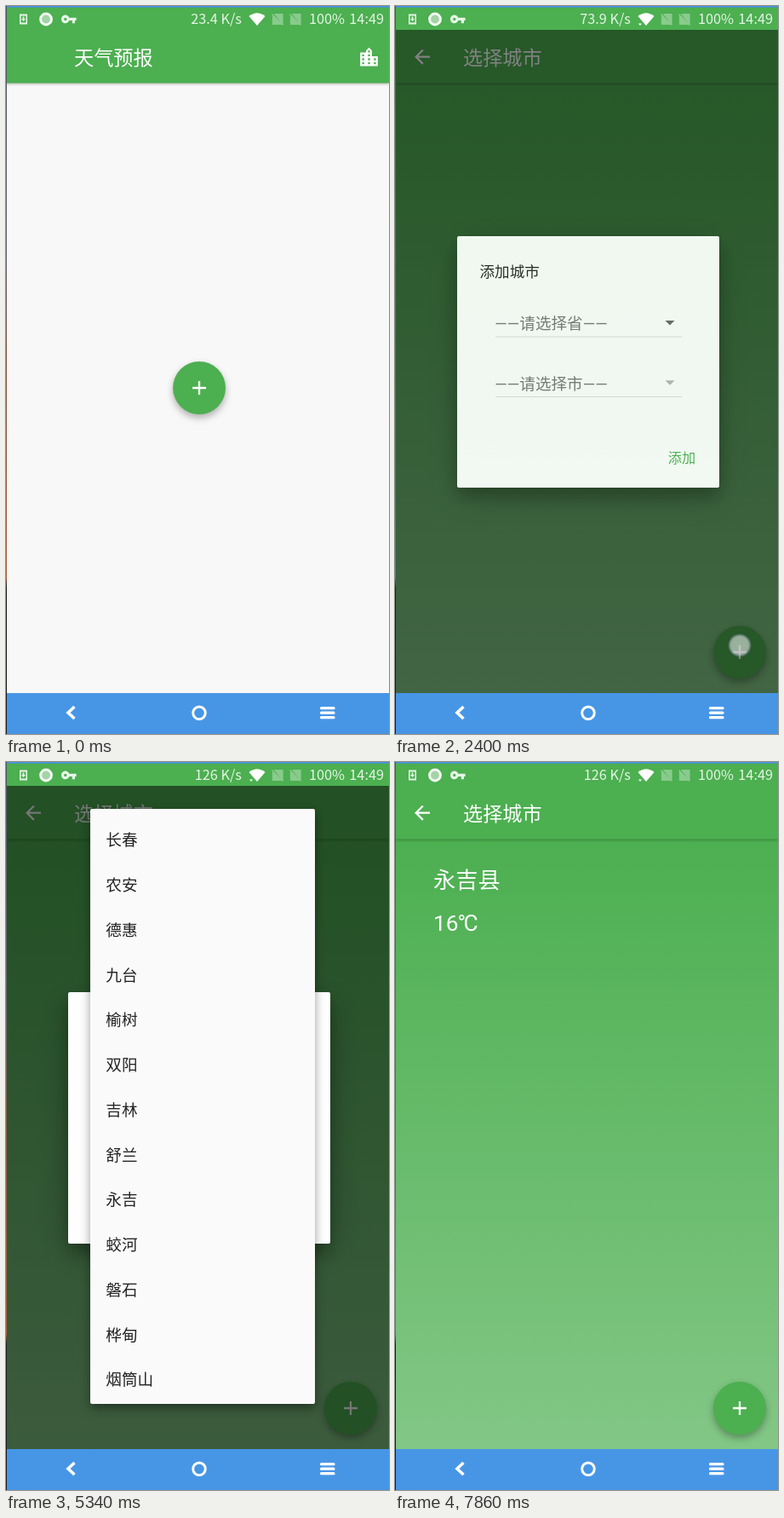
An HTML page for the animation above (8000 ms loop, 450 by 854 pixels).

```html
<!DOCTYPE html>
<html lang="zh-CN">
<head>
<meta charset="utf-8">
<title>天气预报</title>
<style>
  html, body { margin: 0; width: 100%; height: 100%; overflow: hidden; background: #f8f8f8; }
  svg { display: block; width: 450px; height: 854px; }
  text { font: 18.6px Roboto, "Noto Sans CJK SC", "Noto Sans CJK", sans-serif; fill: #242424; }
  .bar-text { font: 500 16.3px "Noto Sans CJK SC", "Noto Sans CJK", sans-serif; fill: #e6f5e7; text-anchor: end; }
  .title { font-size: 23.2px; fill: #fff; }
  .head { font-size: 17.6px; }
  .small { font-size: 16.2px; text-anchor: middle; }
  .action { font-weight: 500; fill: #4caf50; }
  .weather { font-size: 26.3px; fill: #fff; }
  .hint { fill: #777; }
  .green { fill: #4caf50; }
  .white { fill: #fff; }
  .raised { filter: drop-shadow(0 1px 1.5px rgba(0,0,0,.28)); }

  /* The clock below sets the time of every animation. */
  * { animation-play-state: paused !important; }

  /* Visible from --a to --b, fading over --i and --o. */
  .span {
    --a: 0ms; --b: 9000ms; --i: 0s; --o: 0s; --ease-out: linear;
    animation: show var(--i) ease-out var(--a) both,
               hide var(--o) var(--ease-out) var(--b) forwards;
  }
  @keyframes show { from { opacity: 0 } to { opacity: 1 } }
  @keyframes hide { from { opacity: 1 } to { opacity: 0 } }

  .page {
    animation: show 276ms cubic-bezier(.42,0,1,1) 1284ms both,
               rise 276ms cubic-bezier(.4,0,.2,1) 1284ms both;
  }
  @keyframes rise { from { transform: translateY(201px) } to { transform: none } }

  /* The button flies along a circular arc and stays upright. */
  .arc { transform-origin: 46px 758px; animation: arc 276ms cubic-bezier(.4,0,.2,1) 1284ms both; }
  .upright { transform-origin: 405px 758px; animation: upright 276ms cubic-bezier(.4,0,.2,1) 1284ms both; }
  @keyframes arc { from { transform: rotate(-59.72deg) } to { transform: rotate(0deg) } }
  @keyframes upright { from { transform: rotate(59.72deg) } to { transform: rotate(0deg) } }
  .fab { fill: #4caf50; filter: drop-shadow(0 4px 4px rgba(0,0,0,.3)); }

  .sheet {
    fill: #fefefe;
    filter: drop-shadow(0 10px 9px rgba(0,0,0,.25)) drop-shadow(0 10px 20px rgba(0,0,0,.22));
  }
  .panel {
    x: 99px; width: 264px; fill: #fafafa;
    filter: drop-shadow(0 5px 6px rgba(0,0,0,.38));
    animation: unfold 75ms ease calc(var(--a) + 75ms) both;
  }
  @keyframes unfold { from { y: 64px; height: 53px } to { y: 55px; height: 698px } }

  .touch { fill: url(#dot); }
  .drift { animation: drift 360ms ease-in-out 6660ms both; }
  @keyframes drift { to { transform: translate(-4px, -5px) } }
</style>
</head>
<body>
<svg viewBox="0 0 450 854">
  <defs>
    <linearGradient id="sky" gradientUnits="userSpaceOnUse" x1="0" y1="90" x2="0" y2="806">
      <stop stop-color="#4caf50"/><stop offset="1" stop-color="#83c786"/>
    </linearGradient>
    <linearGradient id="edge" x2="0" y2="1">
      <stop stop-color="#4d5566"/><stop offset=".35" stop-color="#6a6473"/>
      <stop offset=".5" stop-color="#8a5a40"/><stop offset=".785" stop-color="#a8603a"/>
      <stop offset=".8" stop-color="#1c1c1e"/><stop offset="1" stop-color="#1c1c1e"/>
    </linearGradient>
    <radialGradient id="dot">
      <stop stop-color="#fff" stop-opacity=".82"/><stop offset=".74" stop-color="#f6f6fc" stop-opacity=".82"/>
      <stop offset=".86" stop-color="#b4b4d0" stop-opacity=".75"/><stop offset="1" stop-color="#9a9ac0" stop-opacity="0"/>
    </radialGradient>
    <path id="nosim" d="M4 1h9v11zM1.500 3.500V13h9.500zM.5 1l13 13" stroke-width="1.200"/>
    <path id="caret" d="M-5.500-2.800h11l-5.500 5.600z"/>
  </defs>

  <!-- Home -->
  <rect width="450" height="854" fill="#f8f8f8"/>
  <rect class="green raised" width="450" height="90.500"/>
  <text class="title" x="80" y="68.500">天气预报</text>
  <path class="white" transform="translate(412.700 46.400) scale(1.150)" d="M15 11V5l-3-3-3 3v2H3v14h18V11h-6zm-8 8H5v-2h2v2zm0-4H5v-2h2v2zm0-4H5V9h2v2zm6 8h-2v-2h2v2zm0-4h-2v-2h2v2zm0-4h-2V9h2v2zm0-4h-2V5h2v2zm6 12h-2v-2h2v2zm0-4h-2v-2h2v2z"/>
  <text class="small span" style="--a:1320ms" x="227" y="455">重试</text>

  <!-- City list -->
  <g class="page">
    <rect width="450" height="806" fill="url(#sky)"/>
    <rect class="green raised" width="450" height="90.500"/>
    <path class="white" transform="translate(18.600 46.300) scale(1.120)" d="M20 11H7.830l5.590-5.590L12 4l-8 8 8 8 1.410-1.410L7.830 13H20v-2z"/>
    <text class="title" x="80" y="68.500">选择城市</text>
    <g class="span" style="--a:7860ms">
      <text class="weather" x="45" y="147.500">永吉县</text>
      <text class="weather" x="45" y="197.500">16℃</text>
    </g>
  </g>
  <g class="arc"><g class="upright">
    <circle class="fab" cx="405" cy="758" r="31"/>
    <path d="M397 758h16M405 750v16" stroke="#fff" stroke-width="2.300"/>
  </g></g>

  <!-- Dialog -->
  <g class="span" style="--a:2285ms;--i:150ms;--b:7400ms;--o:150ms;--ease-out:ease-in">
    <rect y="28" width="450" height="778" fill-opacity=".54"/>
    <rect class="sheet" x="73" y="270" width="308" height="295" rx="2"/>
    <text class="head" x="99.500" y="317.500">添加城市</text>
    <path d="M118 388h219M118 458.500h219" stroke="#dcdcdc"/>
    <text class="hint span" style="--b:4440ms" x="117.300" y="379">——请选择省——</text>
    <text class="span" style="--a:4440ms" x="117.300" y="379">吉林省</text>
    <text class="hint span" style="--b:6120ms" x="117.300" y="449.500">——请选择市——</text>
    <text class="span" style="--a:6120ms" x="117.300" y="449.500">永吉</text>
    <use href="#caret" x="323" y="371.800" fill="#666"/>
    <use href="#caret" x="323" y="442" fill="#b4b4b4"/>
    <use class="span" style="--a:4560ms" href="#caret" x="323" y="442" fill="#666"/>
    <text class="small action" x="337" y="536">添加</text>
  </g>

  <!-- Menus -->
  <g class="menu span" style="--a:3225ms;--i:75ms;--b:4440ms;--o:240ms;--ease-out:steps(2,start)"
     data-open="3225" data-items="北京 上海 天津 重庆 黑龙江省 吉林省 辽宁省 内蒙古自治区 河北省 山西省 陕西省 山东省 新疆维吾尔自治区">
    <rect class="panel" rx="2"/>
  </g>
  <g class="menu span" style="--a:5030ms;--i:75ms;--b:6120ms;--o:120ms;--ease-out:steps(2,start)"
     data-open="5030" data-items="长春 农安 德惠 九台 榆树 双阳 吉林 舒兰 永吉 蛟河 磐石 桦甸 烟筒山">
    <rect class="panel" rx="2"/>
  </g>

  <!-- Status bar -->
  <rect class="green" width="450" height="28"/>
  <rect width="450" height="1.700" fill="#4a92dc"/>
  <g fill="#e6f5e7">
    <path fill-rule="evenodd" d="M16 9.500h9v12h-9zM17.500 11.500v8h6v-8z"/>
    <path d="M19.600 12.500h1.800v2.500h1.600l-2.500 3-2.500-3h1.600z"/>
    <circle cx="47" cy="15.500" r="6.400" fill="#a4d3a6" stroke="#f2f9f2" stroke-width="3"/>
    <path transform="translate(64.200 5.800) scale(.8)" d="M12.650 10C11.830 7.670 9.610 6 7 6c-3.310 0-6 2.690-6 6s2.690 6 6 6c2.610 0 4.830-1.670 5.650-4H17v4h4v-4h2v-4H12.650zM7 14c-1.100 0-2-.9-2-2s.9-2 2-2 2 .9 2 2-.9 2-2 2z"/>
    <path class="white" d="M295 23L285.500 12Q295 4.500 304.500 12z"/>
    <g class="white">
      <path class="span" style="--a:1860ms;--b:2820ms" d="M286 20.500h4l-2 2.500z"/>
      <path class="span" style="--a:3780ms;--b:4740ms" d="M286 20.500h4l-2-2.500z"/>
      <path class="span" style="--a:4740ms;--b:6660ms" d="M286 20.500h4l-2 2.500z"/>
      <path class="span" style="--a:7620ms" d="M286 20.500h4l-2 2.500z"/>
    </g>
    <g opacity=".4" stroke="#e6f5e7">
      <use href="#nosim" x="312" y="8.500"/>
      <use href="#nosim" x="333" y="8.500"/>
    </g>
  </g>
  <text class="bar-text span" style="--b:2340ms" x="277" y="21.300">23.4 K/s</text>
  <text class="bar-text span" style="--a:2340ms;--b:5280ms" x="277" y="21.300">73.9 K/s</text>
  <text class="bar-text span" style="--a:5280ms" x="277" y="21.300">126 K/s</text>
  <text class="bar-text" x="398" y="21.300">100%</text>
  <text class="bar-text" x="444" y="21.300">14:49</text>

  <!-- Navigation bar -->
  <rect y="806" width="450" height="48" fill="#4796e6"/>
  <g fill="none" stroke="#fff">
    <path d="M80.500 822l-7.500 7 7.500 7" stroke-width="3.600"/>
    <circle cx="227" cy="829.300" r="7.300" stroke-width="2.900"/>
    <path d="M370.500 823.700h14.500m-14.500 5.500h14.500m-14.500 5.500h14.500" stroke-width="3.200" stroke-linecap="round"/>
  </g>
  <rect width="1" height="854" fill="url(#edge)"/>

  <!-- Touches -->
  <g class="touches">
    <circle class="touch span" style="--a:1200ms;--b:1320ms" cx="227" cy="448" r="14"/>
    <circle class="touch span" style="--a:2220ms;--b:2400ms;--o:120ms;--ease-out:steps(3,start)" cx="405" cy="750" r="14" opacity=".4"/>
    <circle class="touch span" style="--a:3180ms;--b:3300ms" cx="300" cy="372" r="14"/>
    <circle class="touch span" style="--a:4260ms;--b:4440ms;--o:240ms;--ease-out:steps(2,start)" cx="197.500" cy="355" r="14"/>
    <circle class="touch span" style="--a:4980ms;--b:5100ms" cx="300" cy="442" r="14"/>
    <circle class="touch span" style="--a:6000ms;--b:6120ms" cx="197" cy="513" r="14"/>
    <g class="drift"><circle class="touch span" style="--a:6660ms;--b:7020ms" cx="375" cy="517" r="14"/></g>
    <circle class="touch span" style="--a:7320ms;--b:7440ms" cx="340" cy="528" r="14"/>
  </g>
</svg>
<script>
  const LOOP = 8000, STEP = 60;

  function addRow(menu, label, i) {
    const row = document.createElementNS("http://www.w3.org/2000/svg", "text");
    row.setAttribute("x", 117.3);
    row.setAttribute("y", 98.4 + i * 52.75);
    row.textContent = label;
    if (i) {
      row.classList.add("span");
      row.style.setProperty("--a", `${+menu.dataset.open + 150 + i * 5}ms`);
      row.style.setProperty("--i", "20ms");
    }
    menu.append(row);
  }

  for (const menu of document.querySelectorAll(".menu"))
    menu.dataset.items.split(" ").forEach((label, i) => addRow(menu, label, i));

  const animations = document.getAnimations();
  const start = performance.now();

  // The screen refreshes in steps of 60 ms.
  function tick(now) {
    const time = Math.max(0, now - start) % LOOP;
    const shown = Math.floor(time / STEP) * STEP;
    for (const a of animations) a.currentTime = shown;
    requestAnimationFrame(tick);
  }
  tick(start);
</script>
</body>
</html>
```
